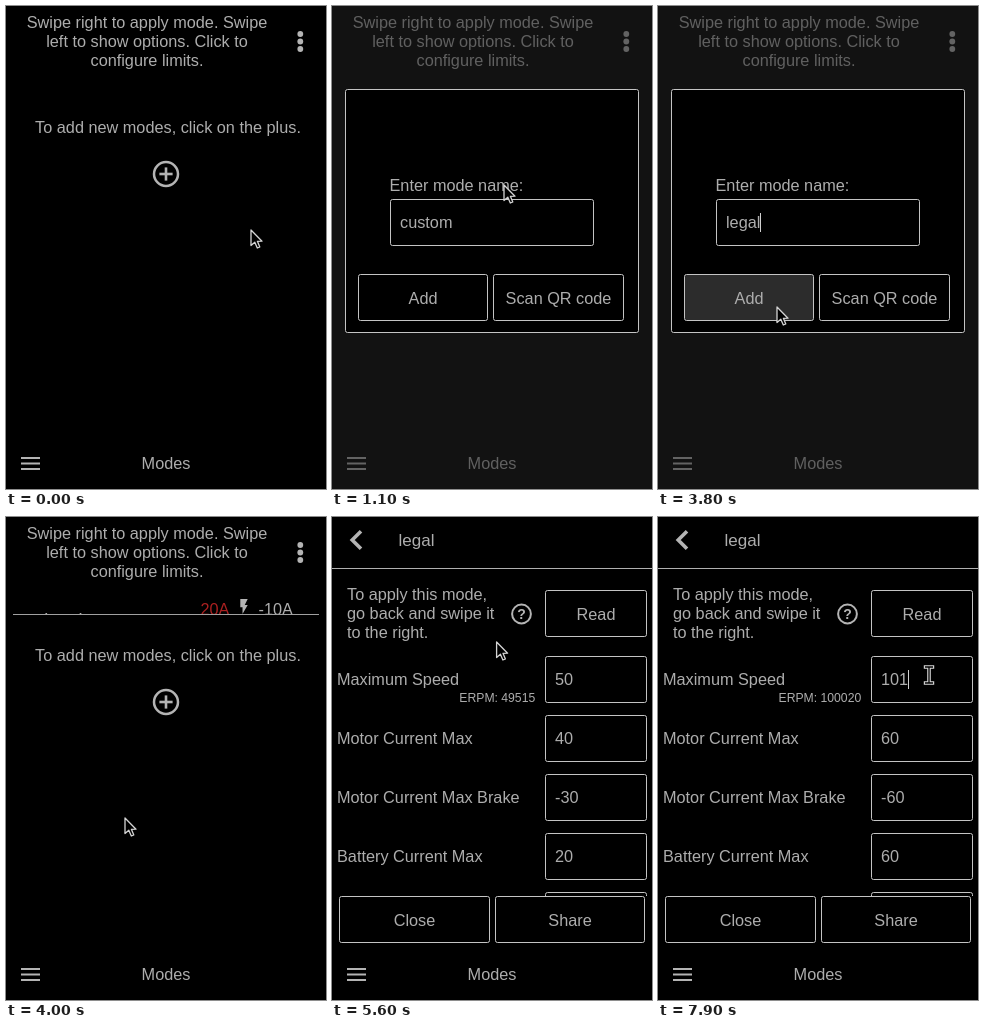
Recreate the animation shown at these times as an HTML page with a canvas. Size 320 px wide and 483 px high, loop 8000 ms.

```html
<!DOCTYPE html>
<html lang="en">
<head>
<meta charset="utf-8">
<title>Modes</title>
<style>
html, body { margin: 0; width: 100%; height: 100%; overflow: hidden; background: #000; }
canvas { display: block; width: 320px; height: 483px; }
</style>
</head>
<body>
<canvas id="stage"></canvas>
<script>
const W = 320, H = 483, LOOP = 8000, STEP = 100;
const INK = '#adadad', EDGE = '#c4c4c4', ICON = '#b4b4b4', RED = '#aa2020', PRESS = '#2c2c2c';
const SIZE = 16.27, ROW_TOP = 80, ROW_H = 71;
const canvas = document.getElementById('stage');
const ctx = canvas.getContext('2d');
const dpr = window.devicePixelRatio || 1;
canvas.width = W * dpr;
canvas.height = H * dpr;

// Pointer stops: time, x, y
const path = [
  [0, 245, 224], [900, 172, 179],
  [1300, 172, 179], [1400, 177, 193], [1500, 192, 221], [1600, 184, 215], [1700, 179, 213],
  [3300, 179, 213], [3400, 186, 216], [3500, 165, 252], [3600, 134, 289], [3700, 118, 306], [3800, 119, 301],
  [4400, 119, 301], [5200, 164.6, 125],
  [5700, 164.6, 125], [6500, 229, 103],
  [7100, 229, 103], [7800, 271, 158]
];

const between = (t, a, b) => t >= a && t < b;
const lerp = (a, b, k) => a + (b - a) * k;

function pointer(t) {
  let i = 0;
  while (i < path.length - 1 && path[i + 1][0] <= t) i++;
  const a = path[i], b = path[i + 1];
  if (!b) return [a[1], a[2]];
  let k = (t - a[0]) / (b[0] - a[0]);
  k = k * k * (3 - 2 * k);
  return [lerp(a[1], b[1], k), lerp(a[2], b[2], k)];
}

const font = (size, weight = '') => `${weight} ${size}px "Liberation Sans", Arial, sans-serif`;

function text(s, x, y, { size = SIZE, align = 'left', color = INK, weight = '' } = {}) {
  ctx.font = font(size, weight);
  ctx.textAlign = align;
  ctx.fillStyle = color;
  ctx.fillText(s, x, y);
}

const centered = (s, x, y) => text(s, x, y, { align: 'center' });

function rect(x, y, w, h, color) {
  ctx.fillStyle = color;
  ctx.fillRect(x, y, w, h);
}

function frame(x, y, w, h, fill = '#000') {
  ctx.beginPath();
  ctx.roundRect(x + 0.5, y + 0.5, w, h, 2);
  ctx.fillStyle = fill;
  ctx.fill();
  ctx.strokeStyle = EDGE;
  ctx.lineWidth = 1;
  ctx.stroke();
}

function button(label, x, y, w, pressed = false) {
  frame(x, y, w, 46, pressed ? PRESS : '#000');
  centered(label, x + w / 2 + 0.5, y + 29.5);
}

function poly(points, close = true) {
  ctx.beginPath();
  points.forEach(([x, y]) => ctx.lineTo(x, y));
  if (close) ctx.closePath();
}

function ring(x, y, r, width, color = ICON) {
  ctx.beginPath();
  ctx.arc(x, y, r, 0, Math.PI * 2);
  ctx.strokeStyle = color;
  ctx.lineWidth = width;
  ctx.stroke();
}

function dot(x, y, r) {
  ctx.beginPath();
  ctx.arc(x, y, r, 0, Math.PI * 2);
  ctx.fillStyle = ICON;
  ctx.fill();
}

function plus(x, y, pressed) {
  const color = pressed ? '#808080' : ICON;
  ring(x, y, 12, 2.5, color);
  rect(x - 6.6, y - 1.3, 13.2, 2.6, color);
  rect(x - 1.3, y - 6.6, 2.6, 13.2, color);
}

function bolt(x, y) {
  ctx.save();
  ctx.translate(x, y);
  ctx.scale(0.74, 0.74);
  ctx.translate(-12, -12);
  poly([[7, 2], [7, 13], [10, 13], [10, 22], [17, 10], [13, 10], [17, 2]]);
  ctx.fillStyle = ICON;
  ctx.fill();
  ctx.restore();
}

function motor(x, y) {
  ctx.setLineDash([3.4, 1.5]);
  ring(x, y, 6.2, 1.3);
  ctx.setLineDash([]);
  dot(x, y, 2);
}

function footer() {
  for (const y of [451, 456.5, 462]) rect(15, y, 19, 2, ICON);
  centered('Modes', 160, 462.8);
}

function row(h, pressed) {
  const dy = (h - ROW_H) / 4;
  ctx.save();
  ctx.beginPath();
  ctx.rect(0, ROW_TOP, W, h);
  ctx.clip();
  if (pressed) rect(7, 81, 306, 70, PRESS);
  text('legal', 38.2, 122 + dy, { size: 18.2 });
  text('20A', 194.5, 111 + dy, { color: RED });
  text('40A', 194.5, 134.5 + dy, { color: RED });
  text('-10A', 252.5, 111 + dy);
  text('-30A', 252.5, 134.5 + dy);
  bolt(238, 103 + dy);
  motor(239, 128.5 + dy);
  ctx.restore();
  rect(7, ROW_TOP + h, 306, 1, '#a0a0a0');
}

function modesPage(t) {
  ['Swipe right to apply mode. Swipe', 'left to show options. Click to', 'configure limits.']
    .forEach((s, i) => centered(s, 141, 21.5 + i * 19.4));
  for (const y of [28, 35.5, 43]) dot(294.3, y, 2.9);
  const h = t < 4000 ? 0 : Math.min(ROW_H, 17 + (t - 4000) * 0.37);
  if (h) row(h, between(t, 5300, 5600));
  centered('To add new modes, click on the plus.', 162, 127 + h);
  plus(160, 168 + h, between(t, 900, 1000));
}

function caret(s, x, y) {
  ctx.font = font(SIZE);
  rect(Math.round(x + ctx.measureText(s).width), y - 15, 1, 19, '#d0d0d0');
}

function modeName(t) {
  if (t < 2400) return 'custom';
  const keys = [2400, 2600, 2800, 2900, 3000];
  return 'legal'.slice(0, keys.filter(k => k <= t).length);
}

function dialog(t) {
  ctx.save();
  if (t < 1100) {
    ctx.globalAlpha = 0.6;
  }
  rect(0, 0, W, H, 'rgba(33,33,33,0.55)');
  if (t < 1100) {
    ctx.translate(160, 205);
    ctx.scale(0.97, 0.97);
    ctx.translate(-160, -205);
  }
  frame(13, 83, 293, 243);
  text('Enter mode name:', 57.5, 184.5);
  frame(58, 193, 203, 46);
  const name = modeName(t);
  if (between(t, 2100, 2400)) rect(68, 206, t < 2200 ? 28 : 54, 21, '#606060');
  text(name, 68, 222);
  if (t >= 1700 && !between(t, 2100, 2400)) caret(name, 68, 222);
  button('Add', 26, 268, 129, between(t, 3800, 4000));
  button('Scan QR code', 161, 268, 130);
  ctx.restore();
}

function settingsPage(t) {
  const read = t >= 6800;
  poly([[29, 14.2], [20.2, 23], [29, 31.8]], false);
  ctx.strokeStyle = ICON;
  ctx.lineWidth = 3.6;
  ctx.stroke();
  text('legal', 66.5, 29, { size: 17 });
  rect(0, 51, W, 1, '#b0b0b0');

  ['To apply this mode,', 'go back and swipe it', 'to the right.']
    .forEach((s, i) => text(s, 15, 82.5 + i * 19.4));
  ring(189.5, 97, 9.4, 2);
  text('?', 189.5, 102, { size: 14, align: 'center', color: ICON, weight: 'bold' });
  button('Read', 213, 73, 101, between(t, 6600, 6900));

  const fields = [
    ['Maximum Speed', '50', '101'],
    ['Motor Current Max', '40', '60'],
    ['Motor Current Max Brake', '-30', '-60'],
    ['Battery Current Max', '20', '60']
  ];
  fields.forEach(([label, before, after], i) => {
    const y = 139 + i * 59;
    text(label, 5, y + 28.5);
    frame(213, y, 101, 46);
    text(read ? after : before, 223, y + 29);
  });
  text('ERPM: ' + (read ? 100020 : 49515), 203.2, 184.5, { size: 12.2, align: 'right' });
  if (t >= 7900) caret('101', 223, 168);

  frame(213, 375, 101, 46);
  rect(0, 379, W, 60, '#000');
  button('Close', 7, 379, 150);
  button('Share', 163, 379, 149);
}

function arrow(x, y) {
  ctx.save();
  ctx.translate(x, y);
  poly([[0, 0], [0, 15.5], [3.8, 12.2], [6.3, 18], [8.8, 17], [6.4, 11.3], [11, 11.2]]);
  ctx.fillStyle = '#000';
  ctx.fill();
  ctx.strokeStyle = '#d4d4d4';
  ctx.lineWidth = 1.3;
  ctx.lineJoin = 'round';
  ctx.stroke();
  ctx.restore();
}

function beam(x, y) {
  for (const [color, width] of [['#d8d8d8', 3.6], ['#000', 1.3]]) {
    ctx.beginPath();
    for (const s of [-1, 1]) {
      ctx.moveTo(x - 3.4, y + 8 * s);
      ctx.lineTo(x + 3.4, y + 8 * s);
    }
    ctx.moveTo(x, y - 8);
    ctx.lineTo(x, y + 8);
    ctx.strokeStyle = color;
    ctx.lineWidth = width;
    ctx.lineCap = 'square';
    ctx.stroke();
  }
  ctx.lineCap = 'butt';
}

function cursor(t) {
  const [x, y] = pointer(t);
  const inName = between(t, 1100, 4000) && between(x, 58, 262) && between(y, 193, 240);
  const inSpeed = t >= 5600 && between(x, 213, 315) && between(y, 139, 186);
  (inName || inSpeed ? beam : arrow)(x, y);
}

function draw(t) {
  ctx.setTransform(dpr, 0, 0, dpr, 0, 0);
  ctx.globalAlpha = 1;
  rect(0, 0, W, H, '#000');
  if (t < 5500) {
    modesPage(t);
  } else if (t < 5600) {
    ctx.globalAlpha = 0.35;
    modesPage(t);
    ctx.globalAlpha = 0.65;
    settingsPage(t);
    ctx.globalAlpha = 1;
  } else {
    settingsPage(t);
  }
  footer();
  if (between(t, 1000, 4000)) dialog(t);
  cursor(t);
}

const start = performance.now();
function tick() {
  const t = (performance.now() - start) % LOOP;
  draw(Math.floor(t / STEP) * STEP);
  requestAnimationFrame(tick);
}
tick();
</script>
</body>
</html>
```
